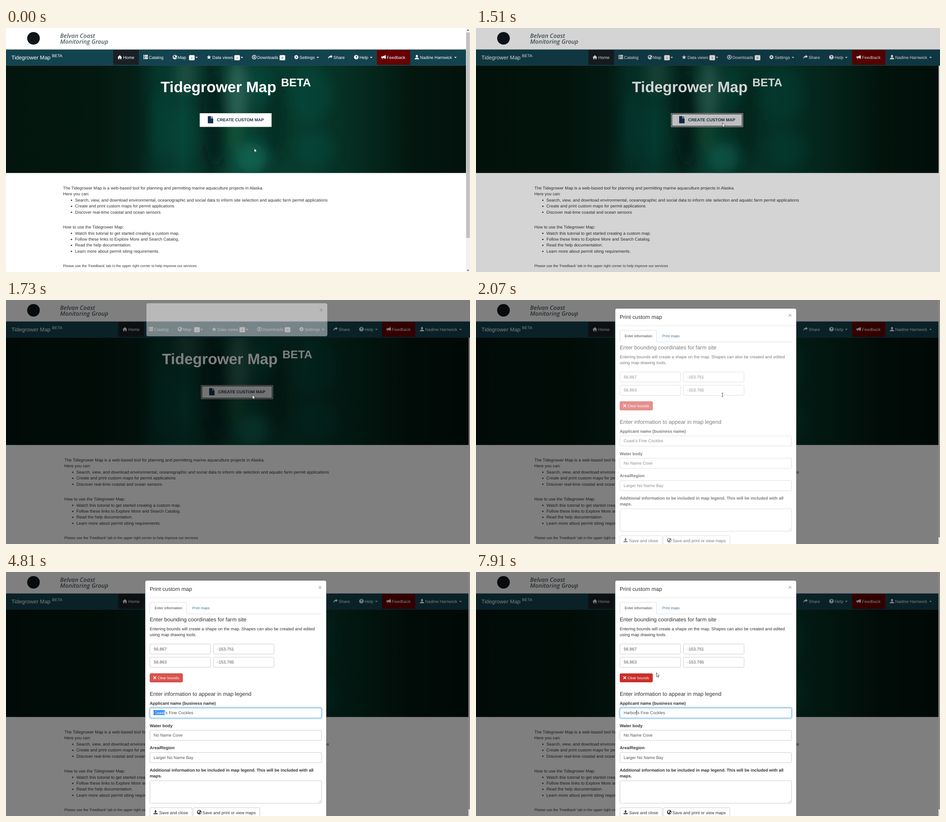
Animation, 1030 px wide and 544 px high, one loop 7990 ms. Source, as an HTML page:

```html
<!DOCTYPE html>
<html lang="en">
<head>
<meta charset="utf-8">
<title>Custom map form</title>
<style>
html, body { margin: 0; width: 100%; height: 100%; overflow: hidden; background: #fff; }
svg { display: block; width: 1030px; height: 544px; }
text { font-family: "Liberation Sans", Arial, sans-serif; white-space: pre; text-rendering: geometricPrecision; }
</style>
</head>
<body>
<svg id="stage" viewBox="0 0 1030 544"></svg>
<script>
const LOOP = 7990;
// Text sizes of the zoomed-out page
const ZOOM = .672;
const BASE = 14 * ZOOM, TITLE = 18 * ZOOM, SMALL = 12 * ZOOM;
const $ = id => document.getElementById(id);

// Drawing helpers
const text = (x, y, s, size = BASE, fill = '#333', extra = '') =>
  `<text x="${x}" y="${y}" font-size="${size}" fill="${fill}" ${extra}>${s}</text>`;
const bold = (x, y, s, size, fill) => text(x, y, s, size, fill, 'font-weight="700"');
const rect = (x, y, w, h, fill, extra = '') =>
  `<rect x="${x}" y="${y}" width="${w}" height="${h}" fill="${fill}" ${extra}/>`;
const box = (x, y, w, h, stroke = '#ccc', fill = '#fff') =>
  rect(x, y, w, h, fill, `stroke="${stroke}" rx="2.5"`);
const line = (x1, x2, y, stroke) => `<path d="M${x1} ${y}H${x2}" stroke="${stroke}"/>`;
const arrowDown = x => `<path d="M${x} 64.5h5.4l-2.7 2.8z" fill="#fff"/>`;
const group = (id, body, extra = '') => `<g id="${id}" ${extra}>${body}</g>`;

const gear = Array.from({ length: 32 }, (_, i) => {
  const r = i % 4 < 2 ? 5 : 3.7, a = i * Math.PI / 16;
  return `${(5 + r * Math.cos(a)).toFixed(2)} ${(5 + r * Math.sin(a)).toFixed(2)}`;
}).join('L');

const ICONS = {
  home: 'M0 5.5L5 .5L10 5.5L9.2 6.3L8.5 5.7V9.8H6V6.5H4V9.8H1.5V5.7L.8 6.3Z',
  list: [0, 3.4, 6.8].map(y => `M0 ${y}h2.2v2.4h-2.2zM3 ${y}h7v2.4h-7z`).join(''),
  globe: 'M5 0a5 5 0 1 0 .01 0zM1.5 3.5L4.5 1L6.5 2.5L4.3 5L4.6 7.5L2.5 6ZM6.5 5L9 4.2L8.2 7.4L6.6 8Z',
  star: 'M5 0L6.3 3.7H10L7 6L8.1 9.8L5 7.5L1.9 9.8L3 6L0 3.7H3.7Z',
  down: 'M5 0a5 5 0 1 0 .01 0zM5 1.3a3.7 3.7 0 1 1-.01 0zM4.2 2.3h1.6v2.7h1.5L5 7.6L2.7 5h1.5z',
  gear: `M${gear}ZM5 3.4a1.6 1.6 0 1 1-.01 0z`,
  share: 'M6 0L10 3.6L6 7.2V5C3.5 5 1.5 6 0 9C.3 5 2.5 2.3 6 2.1Z',
  help: 'M5 0a5 5 0 1 0 .01 0zM3 3.8a2 2 0 1 1 3.2 1.5q-.5.3-.5.9h-1.3q0-1.1.8-1.6a.7.7 0 1 0-.9-.8zM4.4 7h1.3v1.3h-1.3z',
  horn: 'M0 3.5h2.5L10 .5v8.2L2.8 6.4L3.5 9.3H2L1.2 6.2H0Z',
  user: 'M5 0a2.4 2.9 0 1 0 .01 0zM0 9.8q0-2.6 3.5-3.6h3q3.5 1 3.5 3.6z',
  cross: 'M1.8.3L5 3.4L8.2.3L9.7 1.8L6.6 5L9.7 8.2L8.2 9.7L5 6.6L1.8 9.7L.3 8.2L3.4 5L.3 1.8Z',
  save: 'M3.6 0h2.8v3.5h2.3L5 7L1.3 3.5h2.3zM0 7.5h10V10h-10z',
  file: 'M0 0H7V5H12V16H0ZM8.2 0L12 3.8H8.2Z'
};
const icon = (name, x, y, size = 10, fill = '#fff') =>
  `<path d="${ICONS[name]}" fill="${fill}" fill-rule="evenodd" transform="translate(${x} ${y}) scale(${size / 10})"/>`;

// Page
function header() {
  const style = 'style="font-family:\'Open Sans\',\'Noto Sans\',sans-serif" font-style="italic" font-weight="600"';
  return '<circle cx="61" cy="23" r="14" fill="#10161b"/>' +
    text(120, 22, 'Belvan Coast', 13.2, '#4c5f63', style) +
    text(120, 34.7, 'Monitoring Group', 13.2, '#4c5f63', style);
}

function navbar() {
  const items = [
    ['home', 247.5, 260, 'Home'], ['list', 305, 317, 'Catalog'], ['globe', 370, 381.5, 'Map'],
    ['star', 445.5, 458, 'Data views'], ['down', 546, 557.7, 'Downloads'], ['gear', 639.5, 651.5, 'Settings'],
    ['share', 715, 727, 'Share'], ['help', 772.5, 784.7, 'Help'], ['horn', 833, 845.3, 'Feedback'],
    ['user', 907, 919, 'Nadine Harnwick']
  ];
  const badge = (x, n) => rect(x, 60.5, 12.5, 11.5, '#fff', 'rx="2"') +
    text(x + 6.25, 69, n, 7, '#333', 'text-anchor="middle"');
  return rect(0, 47, 1030, 1, '#000', 'opacity=".15"') + rect(0, 48, 1030, 36, '#13434f') +
    line(0, 1030, 48.5, '#2b525c') + line(0, 1030, 83.5, '#23484f') +
    text(12, 70, 'Tidegrower Map', TITLE, '#fff') + text(102, 65, 'BETA', 9.1, '#fff') +
    group('menu', rect(238, 49, 57, 33, '#1a2026') + rect(823.5, 49, 73.5, 33, '#660000') +
      items.map(([i, x, tx, s]) => icon(i, x, 60) + text(tx, 69, s, BASE, '#fff')).join('') +
      badge(406.3, 1) + badge(506.8, 1) + badge(607.3, 0) +
      [420.5, 521, 689.5, 808, 995].map(arrowDown).join(''));
}

function hero() {
  const stops = [[0, '#03150e'], [.2, '#03180f'], [.29, '#042018'], [.33, '#06342a'], [.39, '#084034'],
    [.45, '#062d23'], [.5, '#0b4638'], [.57, '#083a2e'], [.65, '#083c2f'], [.74, '#062f23'],
    [.81, '#04241a'], [.88, '#03170f'], [1, '#02120c']];
  const spots = [
    [400, 105, 24, 40, '#3b5f52', .4], [515, 145, 20, 70, '#4a7f72', .5], [545, 290, 34, 34, '#167562', .6],
    [345, 215, 20, 80, '#0f6552', .2], [395, 235, 24, 60, '#116350', .2], [680, 150, 44, 60, '#13614d', .25],
    [690, 270, 40, 40, '#10614d', .25], [600, 200, 24, 90, '#04231a', .5], [465, 200, 26, 110, '#031b15', .5],
    [565, 130, 22, 40, '#0e5d4b', .35], [510, 235, 20, 40, '#1c6a35', .25]
  ];
  const area = fill => rect(-10, 84, 1034, 239.5, fill);
  return '<defs><linearGradient id="sea">' +
    stops.map(([o, c]) => `<stop offset="${o}" stop-color="${c}"/>`).join('') + '</linearGradient>' +
    '<filter id="soft" x="-80%" y="-80%" width="260%" height="260%"><feGaussianBlur stdDeviation="12"/></filter>' +
    '<filter id="glowBlur" x="-5%" y="-50%" width="110%" height="200%"><feGaussianBlur stdDeviation="1.6"/></filter>' +
    `<clipPath id="heroClip">${area('#000')}</clipPath></defs>` +
    '<g clip-path="url(#heroClip)">' + area('url(#sea)') + '<g filter="url(#soft)">' +
    spots.map(([x, y, rx, ry, c, o]) => `<ellipse cx="${x}" cy="${y}" rx="${rx}" ry="${ry}" fill="${c}" opacity="${o}"/>`).join('') +
    '</g></g>' +
    bold(343.2, 143, 'Tidegrower Map', 50 * ZOOM, '#fff') + bold(610.5, 130, 'BETA', 25, '#fff') +
    rect(430, 190, 159.5, 30.5, '#fff', 'id="create"') +
    group('ring', rect(430.5, 190.5, 158.5, 29.5, 'none', 'stroke="#fff"') +
      rect(431.6, 191.6, 156.3, 27.3, 'none', 'stroke="#101010" stroke-width="1.3"')) +
    icon('file', 448, 196.5, 10, '#17304f') + bold(468, 208, 'CREATE CUSTOM MAP', BASE, '#17304f');
}

function intro() {
  const item = (y, s) => `<circle cx="145.3" cy="${y - 2.8}" r="1.5" fill="#333"/>` + text(153.3, y, s);
  return text(126.5, 360, 'The Tidegrower Map is a web-based tool for planning and permitting marine aquaculture projects in Alaska.') +
    text(126.5, 373.4, 'Here you can:') +
    item(386.8, 'Search, view, and download environmental, oceanographic and social data to inform site selection and aquatic farm permit applications') +
    item(400.2, 'Create and print custom maps for permit applications') +
    item(413.6, 'Discover real-time coastal and ocean sensors') +
    text(126.5, 447, 'How to use the Tidegrower Map:') +
    item(460.5, 'Watch this tutorial to get started creating a custom map.') +
    item(474, 'Follow these links to Explore More and Search Catalog.') +
    item(487.4, 'Read the help documentation.') +
    item(500.8, 'Learn more about permit siting requirements.') +
    text(126.5, 533.3, "Please use the 'Feedback' tab in the upper right corner to help improve our services", BASE * .853);
}

const scrollbar = () => rect(1021, 0, 9, 544, '#f1f1f1') + rect(1021.5, 10, 8, 458, '#c1c1c1') +
  '<path d="M1023 6h5l-2.5-3zM1023 539h5l-2.5 3z" fill="#505050"/>';

// Dialog
function form() {
  const coord = (x, y, s) => box(x, y, 134.5, 22.5) + text(x + 8.5, y + 14.2, s, BASE, '#555');
  const wide = (y, s) => box(319.5, y, 381, 22.5) + text(327.7, y + 14.4, s, BASE, '#555');
  const label = (y, s) => bold(319, y, s, BASE);
  return text(319, 110, 'Enter bounding coordinates for farm site', TITLE) +
    text(319, 129.7, 'Entering bounds will create a shape on the map. Shapes can also be created and edited') +
    text(319, 143.2, 'using map drawing tools.') +
    coord(319.5, 160.5, '56.867') + coord(460.5, 160.5, '-153.751') +
    coord(319.5, 190, '56.863') + coord(460.5, 190, '-153.765') +
    rect(319.5, 226.5, 72.5, 19, '#d9534f', 'id="clear" rx="2" stroke="#d43f3a"') +
    icon('cross', 326.5, 232, 7.5) + text(336.5, 239, 'Clear bounds', SMALL, '#fff') +
    text(319, 276, 'Enter information to appear in map legend', TITLE) +
    label(295.5, 'Applicant name (business name)') +
    rect(319.5, 303, 381, 22.5, 'none', 'id="glow" rx="3" stroke="#66afe9" stroke-width="4" filter="url(#glowBlur)"') +
    box(319.5, 303, 381, 22.5) +
    rect(319.5, 303, 381, 22.5, 'none', 'id="focus" rx="2.5" stroke="#66afe9"') +
    rect(327.7, 308, 0, 11, '#3390ff', 'id="mark"') +
    text(327.7, 317, '<tspan></tspan><tspan fill="#fff"></tspan><tspan></tspan>', BASE, '#555', 'id="field"') +
    rect(0, 308, .9, 11, '#222', 'id="caret"') +
    label(345.5, 'Water body') + wide(352.8, 'No Name Cove') +
    label(395, 'Area/Region') + wide(402.5, 'Larger No Name Bay') +
    label(445, 'Additional information to be included in map legend. This will be included with all') +
    label(458.4, 'maps.') + box(319.5, 465.5, 381, 50) +
    '<path d="M694 514l5-5M697 514l2-2" stroke="#999" stroke-width=".7"/>' +
    box(319.5, 525.5, 93.5, 24) + icon('save', 327.5, 531, 9, '#333') + text(340, 539.5, 'Save and close') +
    box(415.5, 525.5, 148, 24) + icon('globe', 424, 530.5, 10, '#333') + text(436, 539.5, 'Save and print or view maps');
}

const dialog = () =>
  rect(309, 19, 402, 74, '#fff', 'id="sheet" rx="4" stroke="#000" stroke-opacity=".2"') +
  text(697, 39, '×', 14, '#b8b8b8', 'font-weight="700" text-anchor="middle"') +
  group('inside', text(319, 42, 'Print custom map', TITLE) + line(309.5, 710.5, 57.5, '#e5e5e5') +
    '<path d="M319.5 94V70q0-2.5 2.5-2.5H398.5q2.5 0 2.5 2.5V93.5H701" fill="none" stroke="#ddd"/>' +
    text(330, 83, 'Enter information', SMALL, '#444') + text(413.5, 83, 'Print maps', SMALL, '#3d739f') +
    group('form', form()));

const cursors = () =>
  group('arrow', '<path d="M0 0V9.2L2.2 7.3L3.6 10.3L5 9.7L3.7 6.8H6.5Z" fill="#fff" stroke="#111" stroke-width=".7"/>') +
  group('beam', '<path d="M-2 -4.2Q0 -4.2 0 -3.5Q0 -4.2 2 -4.2M0 -3.5V3.7M-2 4.3Q0 4.3 0 3.7Q0 4.3 2 4.3" fill="none" stroke="#444" stroke-width=".9"/>');

$('stage').innerHTML = rect(0, 0, 1030, 544, '#fff') + header() +
  group('content', hero() + intro()) + navbar() + group('pageBar', scrollbar()) +
  rect(0, 0, 1030, 544, '#000', 'id="dim"') +
  group('dialogBar', rect(1026.5, 0, 3.5, 529, '#8a8a8a') + rect(1026.5, 529, 3.5, 15, '#e4e4e4')) +
  group('dialog', dialog()) + cursors();

// Timeline: [first step, last step, steps, x, y]
const MOVES = [
  [310, 650, 4, 547, 221], [860, 960, 2, 547, 211.5], [2630, 3400, 8, 399.5, 315.5],
  [3510, 3620, 2, 351, 311], [3730, 4260, 6, 352, 312.5], [4490, 4930, 5, 317, 314],
  [5250, 5250, 1, 322, 313], [7910, 7910, 1, 400.5, 224.5]
];
const ease = p => (1 - Math.cos(Math.PI * p)) / 2;

function pointer(t) {
  let x = 551, y = 268;
  for (const [start, end, n, tx, ty] of MOVES) {
    if (t < start) break;
    const step = n > 1 ? Math.floor((t - start) * (n - 1) / (end - start)) + 1 : 1;
    const p = ease(Math.min(step, n) / n);
    x += (tx - x) * p;
    y += (ty - y) * p;
  }
  return [x, y];
}

// Last value whose start time has passed
const at = (t, ...keys) => keys.reduce((v, [from, value]) => t >= from ? value : v, keys[0][1]);
const set = (id, name, value) => $(id).setAttribute(name, value);
const show = (id, on) => set(id, 'visibility', on ? 'visible' : 'hidden');
const move = (id, x, y = 0) => set(id, 'transform', `translate(${x} ${y})`);

const FIRST = 'Coast', TYPED = 'Harbor', REST = "'s Fine Cockles";

function drawField(t, x) {
  const word = t < 5800 ? FIRST
    : TYPED.slice(0, at(t, [5800, 1], [6020, 2], [6140, 3], [6360, 4], [6450, 5], [6680, 6]));
  const selecting = t >= 4600 && t < 5800;
  const field = $('field'), [before, picked, after] = field.children;
  before.textContent = word;
  picked.textContent = '';
  after.textContent = REST;
  const offset = n => n ? field.getSubStringLength(0, n) : 0;
  const end = offset(word.length);
  let from = word.length;
  if (selecting) {
    while (from > 0 && 327.7 + (offset(from) + offset(from - 1)) / 2 > x) from--;
  }
  const start = offset(from);
  before.textContent = word.slice(0, from);
  picked.textContent = word.slice(from);
  set('mark', 'x', 327.7 + start);
  set('mark', 'width', end - start);
  set('caret', 'x', 327.7 + end - .2);
  show('caret', t >= 4490 && !selecting && (t < 7210 || t >= 7760));
  const focus = at(t, [0, 0], [4490, .5], [4600, 1]);
  set('focus', 'opacity', focus);
  set('glow', 'opacity', focus * .5);
}

function draw(t) {
  const locked = t >= 1510, open = t >= 1950;
  move('content', locked ? 3 : 0);
  move('menu', locked ? 11.4 : 0);
  show('pageBar', !locked);
  set('create', 'fill', t >= 860 ? '#e6e6e6' : '#fff');
  show('ring', t >= 1290);
  set('dim', 'opacity', at(t, [0, 0], [1510, .17], [1630, .5]));

  set('dialog', 'opacity', at(t, [0, 0], [1730, .45], [1850, 1]));
  move('dialog', open ? 0 : 2.5, at(t, [0, -12], [1850, -1.5], [1950, 0]));
  set('sheet', 'height', open ? 600 : 74);
  set('inside', 'display', open ? 'inline' : 'none');
  set('form', 'opacity', at(t, [0, 0], [1950, .3], [2070, .64], [2190, .9], [2290, 1]));
  show('dialogBar', open);
  set('clear', 'fill', t >= 7910 ? '#c9302c' : '#d9534f');

  const [x, y] = pointer(t);
  const overText = open && (y < 213 || y > 302 || (y > 266 && y < 279));
  move('arrow', x, y);
  move('beam', x, y);
  show('arrow', !overText);
  show('beam', overText);
  drawField(t, x);
}

const began = performance.now();
function tick() {
  draw((performance.now() - began) % LOOP);
  requestAnimationFrame(tick);
}
tick();
</script>
</body>
</html>
```
